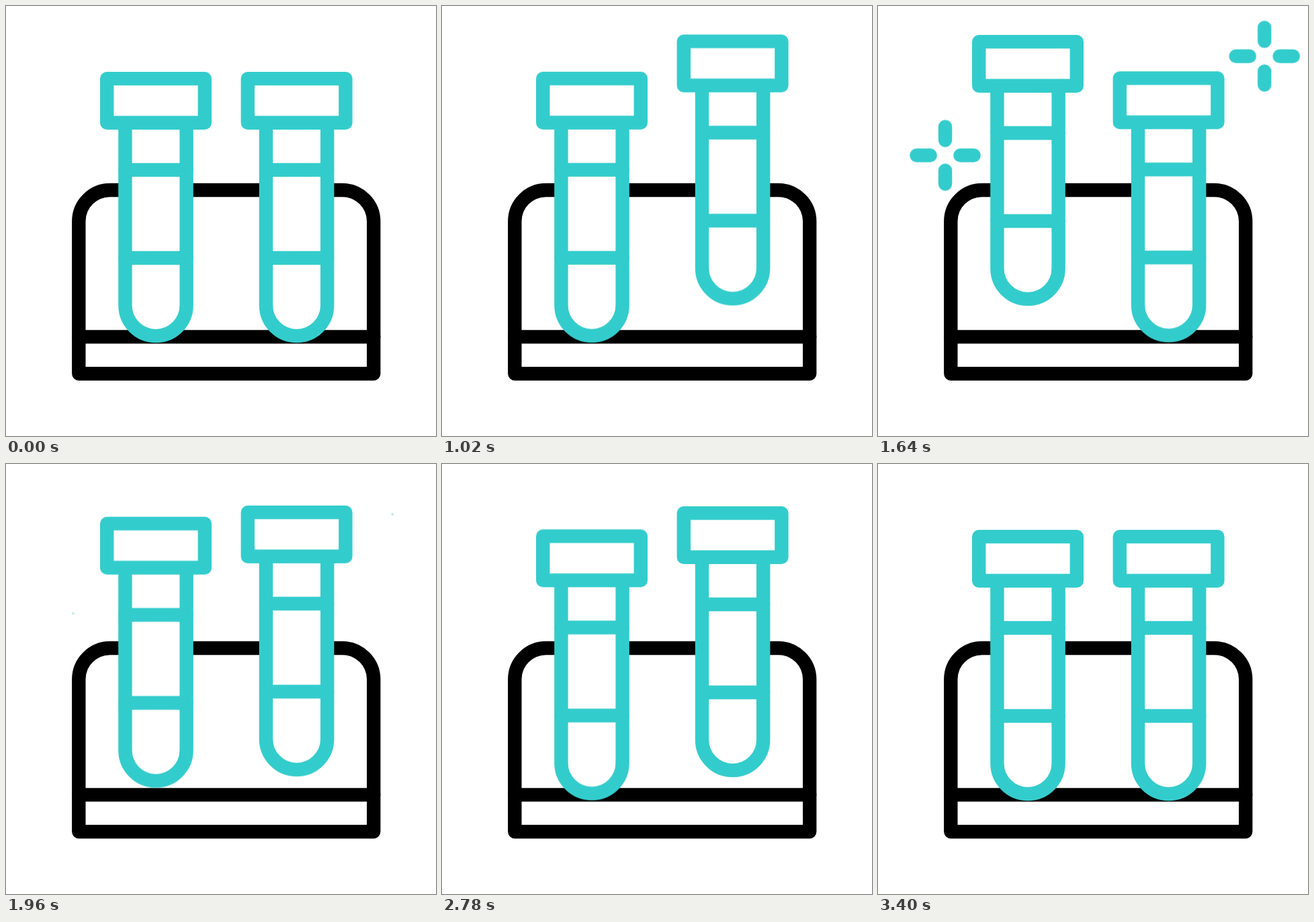
An HTML page that plays this animation: 640x640 px, repeating every 3.6 s.

```html
<!DOCTYPE html>
<html lang="en">
<head>
<meta charset="utf-8">
<title>Test tubes</title>
<style>
  html, body { margin: 0; width: 100%; height: 100%; overflow: hidden; background: #fff; }
  svg { display: block; width: 100vw; height: 100vh; }
  .rack, .tube, .spark {
    fill: none;
    stroke-width: 20.4;
    stroke-linecap: round;
    stroke-linejoin: round;
  }
  .rack { stroke: #000; }
  .tube { fill: #fff; stroke: #3cc; }
  .spark { stroke: #3cc; }

  .left, .right, .pop {
    animation: 3600ms cubic-bezier(.3333, 0, .6667, 1) infinite;
  }
  .left { animation-name: left; }
  .right { animation-name: right; }
  .pop { animation-name: pop; }

  @keyframes right {
    0%, 11.111% { transform: translateY(0); }
    27.778% { transform: translateY(-55.7px); }
    44.444% { transform: translateY(0); }
    61.111% { transform: translateY(-55.7px); }
    72.222% { transform: translateY(0); }
    77.778% { transform: translateY(-36px); }
    83.333% { transform: translateY(0); }
    88.889% { transform: translateY(-23.7px); }
    94.444%, 100% { transform: translateY(0); }
  }
  @keyframes left {
    0%, 27.778% { transform: translateY(0); }
    44.444% { transform: translateY(-55.7px); }
    61.111% { transform: translateY(0); }
    72.222% { transform: translateY(-26px); }
    77.778% { transform: translateY(0); }
    83.333% { transform: translateY(-17px); }
    88.889%, 100% { transform: translateY(0); }
  }
  @keyframes pop {
    0%, 27.778% { transform: scale(0); }
    43.889%, 45.556% { transform: scale(1); }
    55.556%, 100% { transform: scale(0); }
  }
</style>
</head>
<body>
<svg viewBox="0 0 640 640">
  <defs>
    <g id="tube" class="tube">
      <path d="M177.4 173.8V445.6a45.6 45.6 0 0 0 91.2 0V173.8"/>
      <path d="M177.4 244H268.6M177.4 375H268.6"/>
      <path d="M150.2 108.1H295.8V173.8H150.2Z"/>
    </g>
    <path id="spark" class="spark" d="M0 -42.6V-22.4M0 22.4V42.6M-42.6 0H-22.4M22.4 0H42.6"/>
  </defs>
  <g class="rack">
    <path d="M108.3 547.2V320.5a46.5 46.5 0 0 1 46.5 -46.5H500.7a46.5 46.5 0 0 1 46.5 46.5V547.2Z"/>
    <path d="M108.3 492.4H547.2"/>
  </g>
  <g class="left"><use href="#tube"/></g>
  <g class="right"><use href="#tube" x="209.6"/></g>
  <g transform="translate(100 222.3)"><g class="pop"><use href="#spark"/></g></g>
  <g transform="translate(575.2 74.7)"><g class="pop"><use href="#spark"/></g></g>
</svg>
</body>
</html>
```
